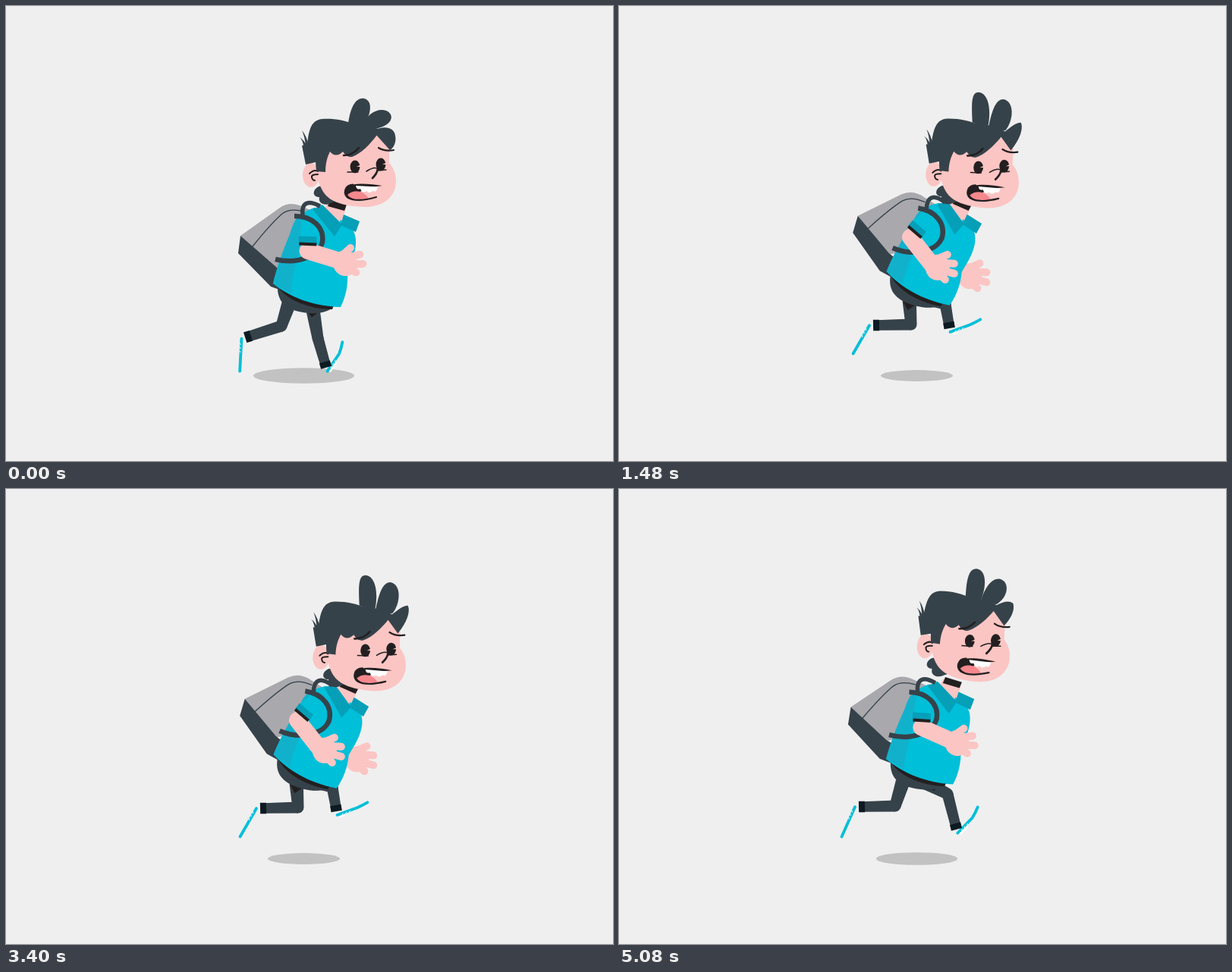
Animation of 800x600 px, one loop 5120 ms. Source, as an HTML page with a canvas:

```html
<!DOCTYPE html>
<html lang="en">
<head>
<meta charset="utf-8">
<title>Runner</title>
<style>
html, body { margin: 0; width: 100%; height: 100%; overflow: hidden; background: #efefef; }
canvas { display: block; width: 800px; height: 600px; }
</style>
</head>
<body>
<canvas id="stage" width="800" height="600"></canvas>
<script>
const ctx = document.getElementById('stage').getContext('2d');
const STEP = 40, CYCLE = 16, TAU = Math.PI * 2;
const C = {
  bg: '#efefef', shadow: '#c2c2c2', navy: '#36424a', cuff: '#0d1a22', black: '#231f20',
  skin: '#fbc5c3', shirt: '#00bfd8', shade: '#12b1cb', collar: '#069fb8',
  bag: '#a8a8ad', tongue: '#f5888d', white: '#ffffff'
};

// Values for the eight poses of one stride
const hipY = [0, 4, 4, -2, -10, -16, -15, -10];
const headY = [0, 6, 10, 11, 8, 1.5, -9, -10.5];
const headTilt = [0, -2, -3, -2, 0, 2, 3.5, 4];
const hairLift = [0, -.15, 0, .35, .8, 1, .85, .6];

// One leg, from ground contact: knee x, y, ankle x, y, foot angle
const legPoses = [
  [411, 438, 421, 473, -56], [407, 440, 401, 476, -12], [398, 440, 373, 476, 4],
  [393, 434, 350, 467, 45], [391, 426, 340, 445, 90], [385, 420, 339, 421, 120],
  [374, 420, 321, 412, 121], [364, 418, 320, 419, 114], [363, 422, 319, 436, 93],
  [374, 430, 331, 455, 80], [395, 434, 362, 460, 52], [415, 422, 399, 451, 22],
  [426, 403, 424, 433, -4], [430, 393, 435, 421, -20], [434, 394, 444, 430, -34],
  [433, 402, 444, 445, -46]
];

// Hair tufts, flopped and raised: start, then two curves through the tip
const tufts = [
  [[451, 155, 453, 139, 459, 120, 472, 122, 485, 125, 480, 146, 471, 157],
   [450, 153, 448, 128, 447, 113, 457, 113, 471, 114, 474, 138, 471, 156]],
  [[470, 157, 476, 142, 490, 134, 501, 138, 513, 143, 510, 158, 486, 162],
   [472, 155, 475, 139, 479, 121, 490, 121, 504, 123, 505, 147, 494, 162]],
  [[485, 164, 498, 157, 512, 160, 513, 171, 515, 180, 510, 188, 506, 190],
   [494, 163, 501, 157, 508, 151, 514, 151, 518, 159, 513, 174, 502, 188]]
];

const wave = (phase, period) => Math.cos(phase * TAU / period);
const rad = deg => deg * Math.PI / 180;

function fill(color, d) { ctx.fillStyle = color; ctx.fill(new Path2D(d)); }

function line(color, width, d, cap = 'round') {
  ctx.strokeStyle = color;
  ctx.lineWidth = width;
  ctx.lineCap = cap;
  ctx.lineJoin = 'round';
  ctx.stroke(new Path2D(d));
}

function oval(color, x, y, rx, ry = rx) {
  ctx.fillStyle = color;
  ctx.beginPath();
  ctx.ellipse(x, y, rx, ry, 0, 0, TAU);
  ctx.fill();
}

function taper(color, x1, y1, w1, x2, y2, w2) {
  const len = Math.hypot(x2 - x1, y2 - y1), nx = (y1 - y2) / len / 2, ny = (x2 - x1) / len / 2;
  fill(color, `M${x1 + nx * w1} ${y1 + ny * w1} L${x2 + nx * w2} ${y2 + ny * w2}
    L${x2 - nx * w2} ${y2 - ny * w2} L${x1 - nx * w1} ${y1 - ny * w1}Z`);
}

function group(draw) { ctx.save(); draw(); ctx.restore(); }

function turn(x, y, deg) {
  ctx.translate(x, y);
  ctx.rotate(rad(deg));
  ctx.translate(-x, -y);
}

function drawShadow(p) {
  const w = Math.min(133, 126 - 36 * wave(p - 5.7, 8));
  oval(C.shadow, 392.5, 487.5, w / 2, w * .078);
}

function drawFoot(x, y, angle, bend) {
  group(() => {
    ctx.translate(x, y);
    ctx.rotate(rad(angle));
    if (bend > 0) line(C.white, 4, `M3 2.5 L${3 + bend * 2.5} 2.5`);
    line(C.shirt, 3.8, `M0 0 L28 0 Q35 ${-bend * .3} 43 ${-bend}`);
    line(C.white, .8, 'M6 1.6 l2 -1 m3 1 l2 -1 m3 1 l2 -1');
  });
}

function drawLeg(phase, lift, far) {
  const [kx, ky, ax, ay, angle] = legPoses[phase];
  const hx = 388 + 15 * wave(phase, CYCLE), hy = 392 + .6 * lift;
  const shin = Math.hypot(ax - kx, ay - ky), dx = (ax - kx) / shin, dy = (ay - ky) / shin;
  const thigh = Math.hypot(kx - hx, ky - hy), ux = (kx - hx) / thigh, uy = (ky - hy) / thigh;
  drawFoot(ax + dx * 9, ay + dy * 9, angle, 5 * Math.max(0, wave(phase, CYCLE)));
  taper(C.navy, hx, hy, 19, kx, ky, 15);
  oval(C.navy, kx, ky, 7.5);
  taper(C.navy, kx, ky, 15, ax, ay, 13.5);
  taper(C.cuff, ax - dx * 4, ay - dy * 4, 14.5, ax + dx * 4, ay + dy * 4, 14.5);
  if (far) taper(C.black, hx + ux * 9, hy + uy * 9, 18, hx + ux * 18 - uy * 3, hy + uy * 18 + ux * 3, 1);
}

function drawArm(x, y, phase) {
  const back = 30 - 28 * wave(phase, CYCLE);
  const fore = 50 - 29 * wave(phase - .8, CYCLE);
  const sin = Math.sin(rad(back)), cos = Math.cos(rad(back));
  const ex = x - 37 * sin, ey = y + 37 * cos;
  const px = ex + 56 * Math.cos(rad(fore)), py = ey + 56 * Math.sin(rad(fore));
  line(C.skin, 22, `M${ex - 7 * sin} ${ey + 7 * cos} L${px - 9} ${py - 1}`);
  group(() => {
    ctx.translate(px, py);
    ctx.rotate(rad(-18 * Math.max(0, wave(phase, CYCLE) * 4 - 3)));
    oval(C.skin, -3, 1, 16, 17);
    line(C.skin, 10, 'M-6 -9 L10 -16 M4 -5 L19 -4 M4 5 L19 9 M0 10 L7 17');
  });
  group(() => {
    ctx.translate(x, y);
    ctx.rotate(rad(back));
    fill(C.shirt, 'M-9 2 Q0 -7 9 2 L11.5 35 L-11.5 35Z');
    fill(C.collar, 'M-12.5 25 L11 25 L12 34 L-12 34Z');
    fill(C.black, 'M-11.5 33 L11.5 33 L11.5 37 L-11.5 37Z');
  });
}

function drawBag() {
  fill(C.bag, 'M309 303 L361 266 Q373 258 387 263 L408 272 L390 335 L357 347Z');
  fill(C.navy, 'M309 303 L306 326 L349 370 L366 376 L366 350 L357 345Z');
  line(C.navy, 1.3, 'M325 317 Q350 286 364 274 Q374 266 393 271');
}

function drawPants() {
  fill(C.navy, 'M358 368 C357 386 365 397 382 402 C399 407 423 407 432 396 L420 375Z');
  fill(C.black, 'M358 368 C364 384 396 400 430 400 L433 392 L400 380Z');
}

function drawTorso() {
  fill(C.skin, 'M425 258 L448 266 L443 283 L438 293 L418 270Z');
  fill(C.black, 'M427 256 L449 262 L446 270 L424 264Z');
  fill(C.shirt, 'M406 266 C392 271 385 277 380 290 C366 318 357 345 352 366 C374 384 405 396 441 397 C448 383 451 368 450 351 C456 336 462 322 461 308 Q460 297 454 291 L441 282 L437 290 L420 268Z');
  fill(C.shade, 'M393 274 C380 277 378 290 374 301 C364 325 356 348 352 366 L376 379 C376 350 390 315 400 280Z');
  fill(C.collar, 'M404 268 L417 262 L443 288 L433 304Z M445 275 L466 284 L461 298 L441 289Z');
  line(C.navy, 5.5, 'M391 276 C389 258 399 256 414 264', 'butt');
  line(C.navy, 6.5, 'M417 311 C414 327 387 342 355 334', 'butt');
}

function drawStrap() {
  line(C.navy, 6.5, 'M380 277 C403 277 420 291 417 312', 'butt');
}

function drawHair(lift) {
  fill(C.navy, 'M390 184 L397 183 C399 164 402 150 417 149 C432 148 447 151 456 155 L474 156 L493 163 L497 169 L489 170 C481 181 468 195 456 199 Q449 200 444 192 C438 198 432 198 427 192 C423 200 421 208 421 219 L409 218 L408 206 L395 209Z');
  fill(C.navy, 'M395 185 Q394 173 390 164 Q396 171 399 184Z M392 184 Q391 177 387 173 Q393 177 396 184Z');
  tufts.forEach(([low, high], i) => {
    const [x, y, ...curves] = low.map((v, k) => v + (high[k] - v) * lift);
    fill(C.navy, `M${x} ${y} C${curves.join(' ')} L${462 + i * 13} ${158 + i * 6}Z`);
  });
}

function drawEye(x, y) {
  oval(C.black, x, y, 6.4, 8.4);
  fill(C.skin, `M${x + 2} ${y} L${x + 8} ${y - 3} L${x + 8} ${y}Z`);
}

function drawMouth() {
  fill(C.black, 'M496 237 C478 234 456 233 449 239 C444 246 448 253 456 255 L468 244 L480 239Z');
  fill(C.tongue, 'M450 249 C457 242 471 242 478 254 C467 257 455 256 450 249Z');
  fill(C.white, 'M461 237 L490 238.5 Q488 247 484 243.5 Q479 248 475 244 Q470 248 467 241 Q462 243 461 237Z');
  line(C.black, 2.2, 'M457 235.5 C446 236 444 248 451 253 C460 258 474 256 488 252');
}

function drawHead(lift) {
  fill(C.navy, 'M412 238 C403 243 404 252 413 252 C411 261 421 264 428 260 L440 255 L425 235Z');
  oval(C.skin, 402, 223, 11, 16);
  fill(C.skin, 'M420 190 L409 216 C412 240 420 252 434 258 C446 263 460 265 475 265 C500 264 514 250 514 231 C514 219 509 211 505 207 L505 186 L490 164 L440 180Z');
  line(C.black, 2, 'M400 221 Q406 215 411 218 M411 222 Q402 222 403 226 Q404 230 407 230');
  drawHair(lift);
  drawEye(460, 212);
  drawEye(494, 209);
  line(C.black, 1.5, 'M450 219 L464 219 M489 217 L501 216');
  line(C.black, 1.5, 'M475 218 Q486 211 490 215');
  line(C.black, 2.7, 'M490 215 Q489 221 483 227');
  line(C.black, 2.5, 'M445 197 Q457 197 465 187');
  line(C.black, 2.2, 'M491 187 Q499 192 511 190');
  drawMouth();
}

function drawPose(p) {
  const s = p % 8, lift = hipY[s];
  const lean = 5.3 * (1 - wave(p, 8));
  const onTorso = draw => group(() => {
    ctx.translate(0, lift);
    turn(352, 370, lean);
    draw();
  });
  const arm = (x, y, phase) => {
    const a = rad(lean), dx = x - 352, dy = y - 370;
    drawArm(352 + dx * Math.cos(a) - dy * Math.sin(a),
      370 + lift + dx * Math.sin(a) + dy * Math.cos(a), phase);
  };
  const opposite = (p + 8) % CYCLE;

  ctx.fillStyle = C.bg;
  ctx.fillRect(0, 0, 800, 600);
  drawShadow(p);
  arm(427, 282, opposite);
  group(() => {
    const sway = 1.5 * Math.sin(p * TAU / 8);
    ctx.translate(5 * sway, 4 * sway);
    onTorso(drawBag);
  });
  drawLeg(p, lift, true);
  drawLeg(opposite, lift, false);
  onTorso(drawPants);
  onTorso(drawTorso);
  arm(399, 279, p);
  onTorso(drawStrap);
  group(() => {
    ctx.translate(8 * (1 - wave(p, 8)), headY[s]);
    turn(477, 211, headTilt[s]);
    drawHead(hairLift[s]);
  });
}

const start = performance.now();
function tick() {
  drawPose(Math.floor(Math.max(0, performance.now() - start) / STEP) % CYCLE);
  requestAnimationFrame(tick);
}
tick();
</script>
</body>
</html>
```
